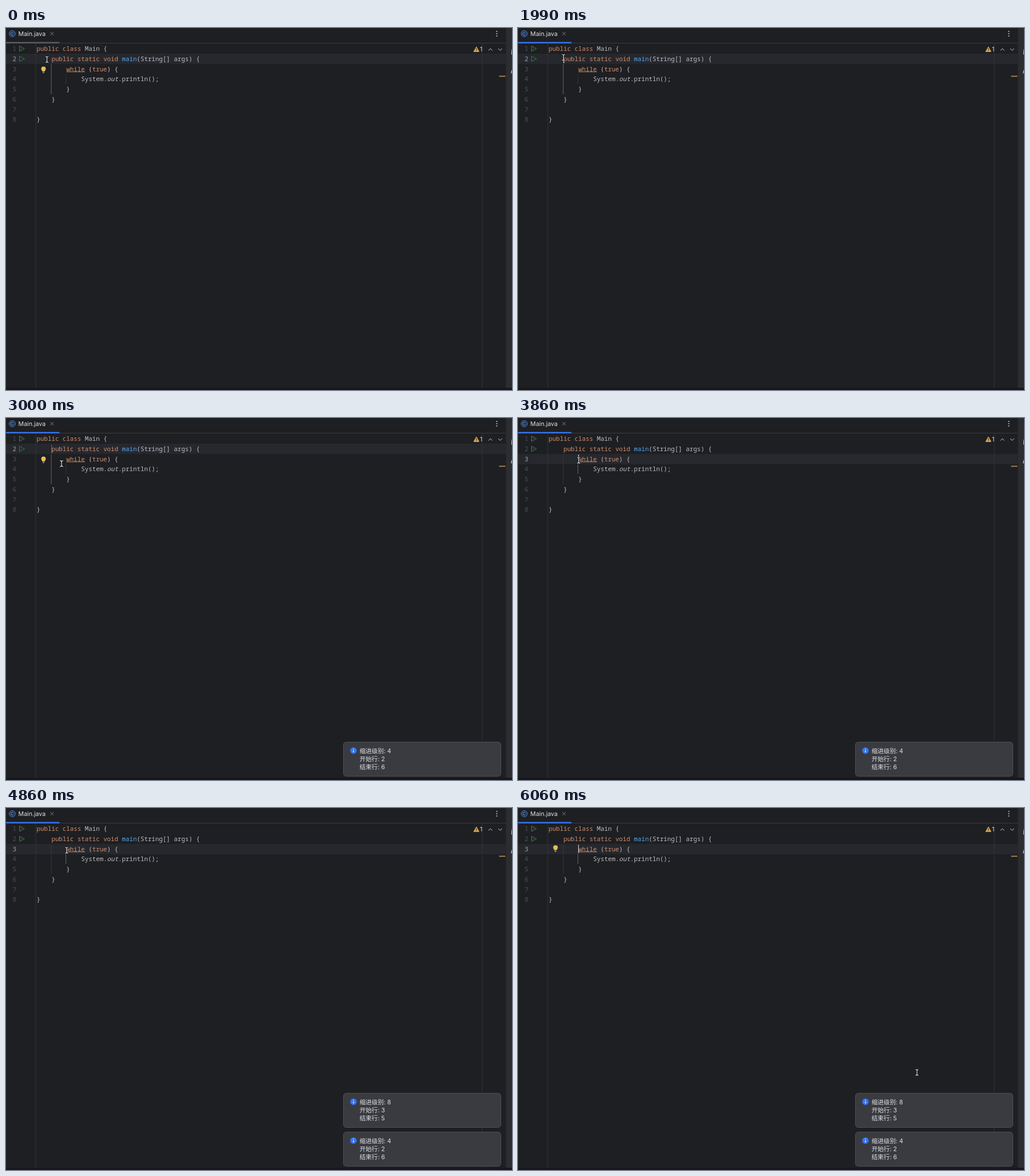
Animation of 884x634 px, one loop 6.13 s. Source, as an HTML page:

```html
<!DOCTYPE html>
<html lang="zh">
<head>
<meta charset="utf-8">
<title>Main.java</title>
<style>
  html, body { margin: 0; width: 100%; height: 100%; overflow: hidden; background: #1e1f22; }
  svg { display: block; width: 884px; height: 634px; }
  .code text { font: 10.8px "Noto Sans Mono", "DejaVu Sans Mono", monospace; white-space: pre; }
  .ui { font: 10.6px Inter, "Noto Sans CJK SC", "Noto Sans CJK", sans-serif; fill: #dfe1e5; }
  .line { fill: none; stroke-linecap: round; stroke-linejoin: round; }
</style>
</head>
<body>
<svg viewBox="0 0 884 634">
  <defs>
    <path id="run" d="M23.5 31.5 L32.3 36.3 L23.5 41.1 Z" fill="#22302a" stroke="#427048" stroke-linejoin="round"/>
    <path id="beam" d="M-2.4 -5 Q0 -5 0 -3.4 V3.4 Q0 5 -2.4 5 M2.4 -5 Q0 -5 0 -3.4 M2.4 5 Q0 5 0 3.4"/>
    <g id="info">
      <circle cx="607" cy="15.5" r="5.7" fill="#3574f0"/>
      <path d="M607 14.9 V18.4" stroke="#fff" stroke-width="1.3"/>
      <circle cx="607" cy="12.8" r=".8" fill="#fff"/>
    </g>
  </defs>

  <rect width="884" height="634" fill="#1e1f22"/>
  <rect id="row" width="873" height="18" fill="#26282e"/>
  <path d="M52 27 V630 M832 27 V630" stroke="#313438"/>
  <rect y="26" width="873" height="1" fill="#393b40"/>
  <rect x="873.5" width="10.5" height="630" fill="#2b2d30"/>
  <rect y="630.5" width="884" height="3.5" fill="#19161b"/>
  <path class="line" d="M884 38 L883.5 46 M884 74 L882.7 79" stroke="#ced0d6" stroke-width="1.2"/>

  <rect id="tab" y="24.6" width="93.5" height="2.3" rx="1"/>
  <circle cx="11" cy="10" r="5.4" fill="#25324d" stroke="#4a7fc8"/>
  <path class="line" d="M13 8.5 A2.5 2.5 0 1 0 13 11.5" stroke="#5a93dd"/>
  <text class="ui" x="21.6" y="14">Main.java</text>
  <path class="line" d="M77.7 7.3 L83 12.6 M83 7.3 L77.7 12.6" stroke="#868a91" stroke-width=".9"/>
  <path class="line" d="M857.5 6 V14.1" stroke="#ced0d6" stroke-width="2" stroke-dasharray="0 4"/>

  <path d="M821.8 33.3 L826.2 41.3 H817.4 Z" fill="#d9a343" stroke="#d9a343" stroke-width="1.2" stroke-linejoin="round"/>
  <path d="M821.8 35.5 V38.4 M821.8 39.5 V40.6" stroke="#1e1f22" stroke-width="1.1"/>
  <text class="ui" x="828" y="41.2">1</text>
  <path class="line" d="M843.2 39.2 L846.3 36.2 L849.4 39.2 M860.3 36.3 L863.4 39.3 L866.5 36.3" stroke="#ced0d6"/>
  <rect x="861.5" y="83.7" width="11" height="1.6" fill="#c29446"/>

  <use href="#run"/><use href="#run" y="17.7"/>
  <path id="outer" d="M79 63.5 V116"/>
  <path id="inner" d="M104.7 81 V98"/>
  <g class="code" id="code"></g>
  <path d="M106 76.8 H138" stroke="#c79a62" stroke-width="1.4" stroke-dasharray="1.2 .9"/>

  <g id="bulb">
    <path d="M-2 3 C-2 1.7 -4 .8 -4 -1.6 A4 4 0 0 1 4 -1.6 C4 .8 2 1.7 2 3 Z" fill="#e9bd59"/>
    <path d="M-1.8 4.2 H1.8 M-1.2 5.6 H1.2" stroke="#a5a7ad"/>
  </g>
  <rect id="caret" width="1.4" height="15" fill="#ced0d6"/>
  <g id="notes"></g>
  <g id="mouse" class="line">
    <use href="#beam" stroke="#101113" stroke-width="2.8"/>
    <use href="#beam" stroke="#e4e5e8" stroke-width="1.2"/>
  </g>
</svg>
<script>
const LOOP = 6130, STEP = LOOP / 92;
const LEFT = 53.5, CHAR = 6.48, PITCH = 17.77;
const FOCUS = 730, NOTE_1 = 2130, CLICK = 3730, NOTE_2 = 4860;
const NS = 'http://www.w3.org/2000/svg';
const $ = id => document.getElementById(id);

function set(el, attrs) {
  for (const key in attrs) el.setAttribute(key, attrs[key]);
}

function add(parent, tag, attrs, text = '') {
  const el = document.createElementNS(NS, tag);
  set(el, attrs);
  el.textContent = text;
  parent.append(el);
  return el;
}

const source = [
  'public class Main {',
  '    public static void main(String[] args) {',
  '        while (true) {',
  '            System.out.println();',
  '        }',
  '    }',
  '',
  '}'
];
const keyword = /^(public|class|static|void|while|true)$/;
const colour = word => keyword.test(word) ? '#cf8e6d' : word === 'main' ? '#56a8f5' : '#bcbec4';

const numbers = source.map((text, i) => {
  const y = 40 + i * PITCH;
  for (const m of text.matchAll(/\w+|[^\w\s]+/g)) {
    const el = add($('code'), 'text', { x: LEFT + m.index * CHAR, y, fill: colour(m[0]) }, m[0]);
    if (m[0] === 'out') el.style.fontStyle = 'italic';
  }
  return add($('code'), 'text', { x: 11.5, y }, i + 1);
});

function note(top, level, from, to) {
  const g = add($('notes'), 'g', { transform: `translate(0 ${top})` });
  add(g, 'rect', { x: 589.5, y: .5, width: 275, height: 60, rx: 5, fill: '#393b40', stroke: '#4b4e54' });
  add(g, 'use', { href: '#info' });
  [`缩进级别: ${level}`, `开始行: ${from}`, `结束行: ${to}`].forEach((s, i) =>
    add(g, 'text', { class: 'ui', x: 617.7, y: 19.5 + i * 14 }, s));
  return g;
}
const first = note(567, 4, 2, 6);
const second = note(499, 8, 3, 5);

const clamp = v => Math.min(1, Math.max(0, v));

// Pointer: a start point plus a few moves that bend slightly downwards.
const moves = [
  { from: 0, to: 200, dx: 8, dy: -3.5 },
  { from: 2400, to: 3000, dx: 17.5, dy: 28.5 },
  { from: 3060, to: 3300, dx: 12.5, dy: 2 },
  { from: 3300, to: 3600, dx: -3.5, dy: -8 },
  { from: 5330, to: 6060, dx: 591, dy: 389 }
];
function pointer(t) {
  let x = 71.5, y = 55;
  for (const m of moves) {
    const p = clamp((t - m.from) / (m.to - m.from));
    x += m.dx * p;
    y += m.dy * p ** 1.5;
  }
  return `translate(${x} ${y})`;
}

// Solid after a click, then fading out and in again.
function blink(age) {
  if (age < 600) return age < 0 ? 0 : 1;
  const phase = (age - 600) % 1070;
  return phase < 560 ? 1 - clamp(phase / 130) : clamp((phase - 560) / 130);
}

const show = (el, on) => set(el, { visibility: on ? 'visible' : 'hidden' });
const within = (t, a, b) => t >= a && t < b;
const guide = on => ({ stroke: on ? '#64676d' : '#34363a' });

function draw(time) {
  const t = Math.floor((time % LOOP + 8) / STEP) * STEP + 1;
  const line = t < CLICK ? 1 : 2;
  const top = 27.3 + line * PITCH;

  set($('row'), { y: Math.round(top) });
  set($('tab'), { fill: t < FOCUS ? '#5a5d63' : '#3574f0' });
  set($('outer'), guide(line === 1));
  set($('inner'), guide(line === 2));
  numbers.forEach((el, i) => set(el, { fill: i === line ? '#a1a3ab' : '#4b5059' }));

  show($('bulb'), t < FOCUS || within(t, 2400, CLICK) || within(t, 4660, NOTE_2) || t >= 5660);
  set($('bulb'), { transform: `translate(65.5 ${line === 1 ? 73 : 70.8})` });
  set($('caret'), {
    x: LEFT + line * 4 * CHAR - .3,
    y: top + 1.4,
    opacity: blink(t - (line === 1 ? FOCUS : CLICK))
  });
  set($('mouse'), { transform: pointer(t) });
  show(first, t >= NOTE_1);
  show(second, t >= NOTE_2);
}

const start = performance.now();
function tick() {
  draw(performance.now() - start);
  requestAnimationFrame(tick);
}
tick();
</script>
</body>
</html>
```
